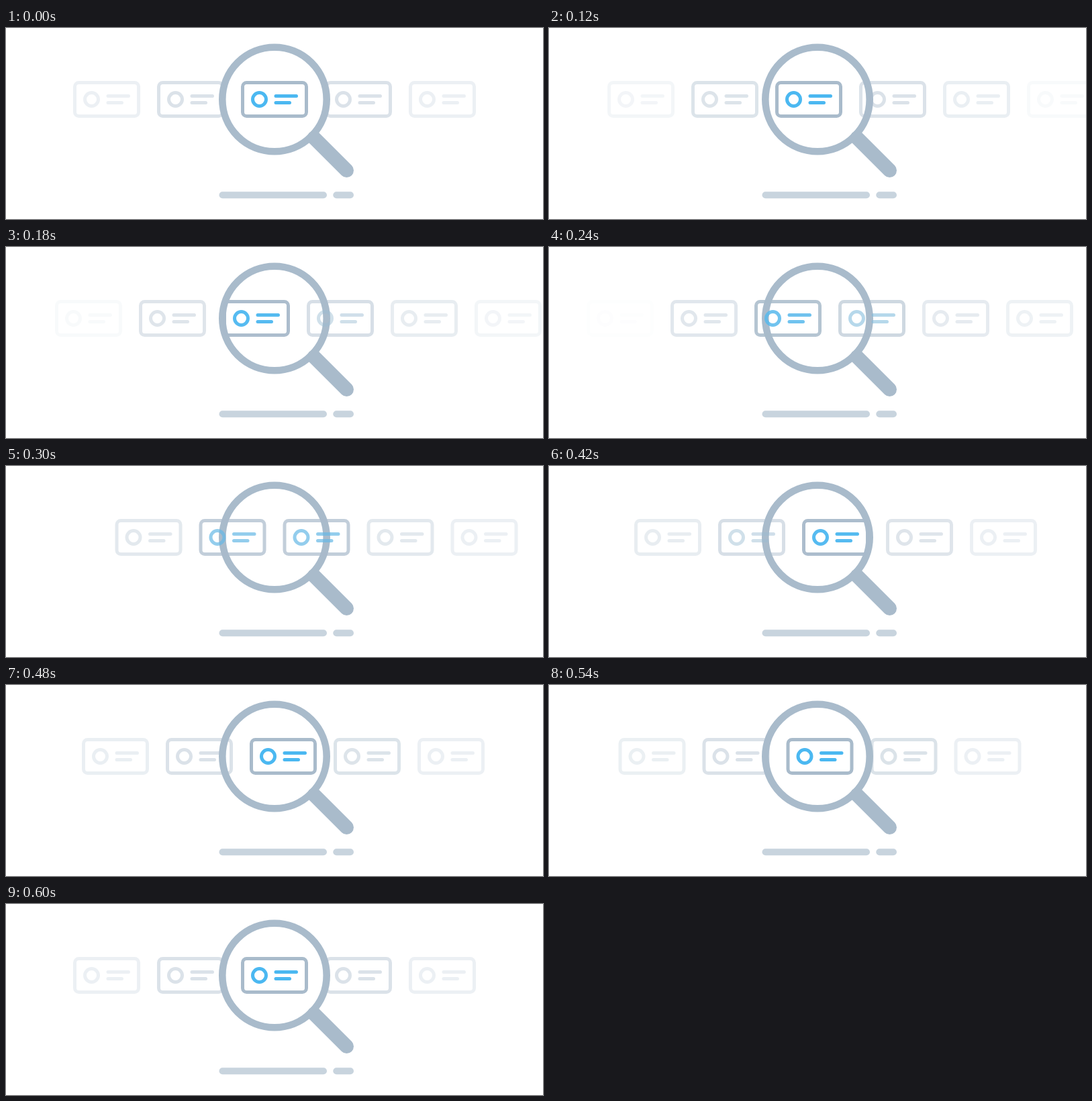
Recreate the animation shown at these times as an HTML page with a canvas. Size 800 px wide and 285 px high, loop 1.2 s.

```html
<!DOCTYPE html>
<html lang="en">
<head>
<meta charset="utf-8">
<title>Search</title>
<style>
  html, body { margin: 0; width: 100%; height: 100%; overflow: hidden; background: #fff; }
  canvas { display: block; }
</style>
</head>
<body>
<canvas id="stage" width="800" height="285"></canvas>
<script>
const ctx = document.getElementById('stage').getContext('2d');

const LOOP = 1200, SLIDE = 600, STEP = 30, GAP = 125;
const GREY = [169, 187, 203], BLUE = [75, 184, 241];
const NEAR = 0.42, FAR = 0.22;

const mix = (a, b, k) => a + (b - a) * k;
const rgba = (c, a) => `rgba(${c.map(Math.round).join()},${a})`;

// Smoothstep of u between two bounds.
function ease(u, from = 0, to = 1) {
  const k = Math.min(1, Math.max(0, (u - from) / (to - from)));
  return k * k * (3 - 2 * k);
}

function line(x1, y1, x2, y2, width, color) {
  ctx.lineWidth = width;
  ctx.strokeStyle = color;
  ctx.beginPath();
  ctx.moveTo(x1, y1);
  ctx.lineTo(x2, y2);
  ctx.stroke();
}

function ring(x, y, r, width, color) {
  ctx.lineWidth = width;
  ctx.strokeStyle = color;
  ctx.beginPath();
  ctx.arc(x, y, r, 0, Math.PI * 2);
  ctx.stroke();
}

// focus: 0 = grey side card, 1 = highlighted card
function card(x, alpha, focus) {
  const a = mix(alpha, 1, focus);
  const tint = a ? GREY.map((g, i) => mix(g, BLUE[i], focus / a)) : GREY;
  const ink = rgba(tint, a);
  ctx.lineWidth = 5;
  ctx.strokeStyle = rgba(GREY, a);
  ctx.beginPath();
  ctx.roundRect(x + 2.5, 81.5, 95, 50, 6);
  ctx.stroke();
  ring(x + 27.5, 106.5, 10, 5, ink);
  line(x + 52, 101.5, x + 82.5, 101.5, 5, ink);
  line(x + 52, 111.5, x + 72.5, 111.5, 5, ink);
}

function lens() {
  const color = rgba(GREY, 1);
  ring(400, 106.5, 77.7, 10.6, color);
  line(459, 164, 507.5, 212.5, 21, color);
  line(322.5, 249.3, 473, 249.3, 10, '#c8d4de');
  line(492.3, 249.3, 513, 249.3, 10, '#c8d4de');
}

function draw(time) {
  const u = Math.min(1, Math.floor((time % LOOP) / STEP) * STEP / SLIDE);
  const p = ease(u);
  const edge = ease(u, 0, 0.5);
  const focus = ease(u, 0.2, 0.8);
  const x = i => 100 + (i - p) * GAP;

  ctx.fillStyle = '#fff';
  ctx.fillRect(0, 0, 800, 285);
  ctx.lineCap = 'round';
  lens();
  card(x(0), FAR * (1 - edge), 0);
  card(x(1), mix(NEAR, FAR, p), 0);
  card(x(2), NEAR, 1 - focus);
  card(x(3), NEAR, focus);
  card(x(4), mix(FAR, NEAR, p), 0);
  card(x(5), FAR * edge, 0);
}

const start = performance.now();
function tick() {
  draw(performance.now() - start);
  requestAnimationFrame(tick);
}
tick();
</script>
</body>
</html>
```
